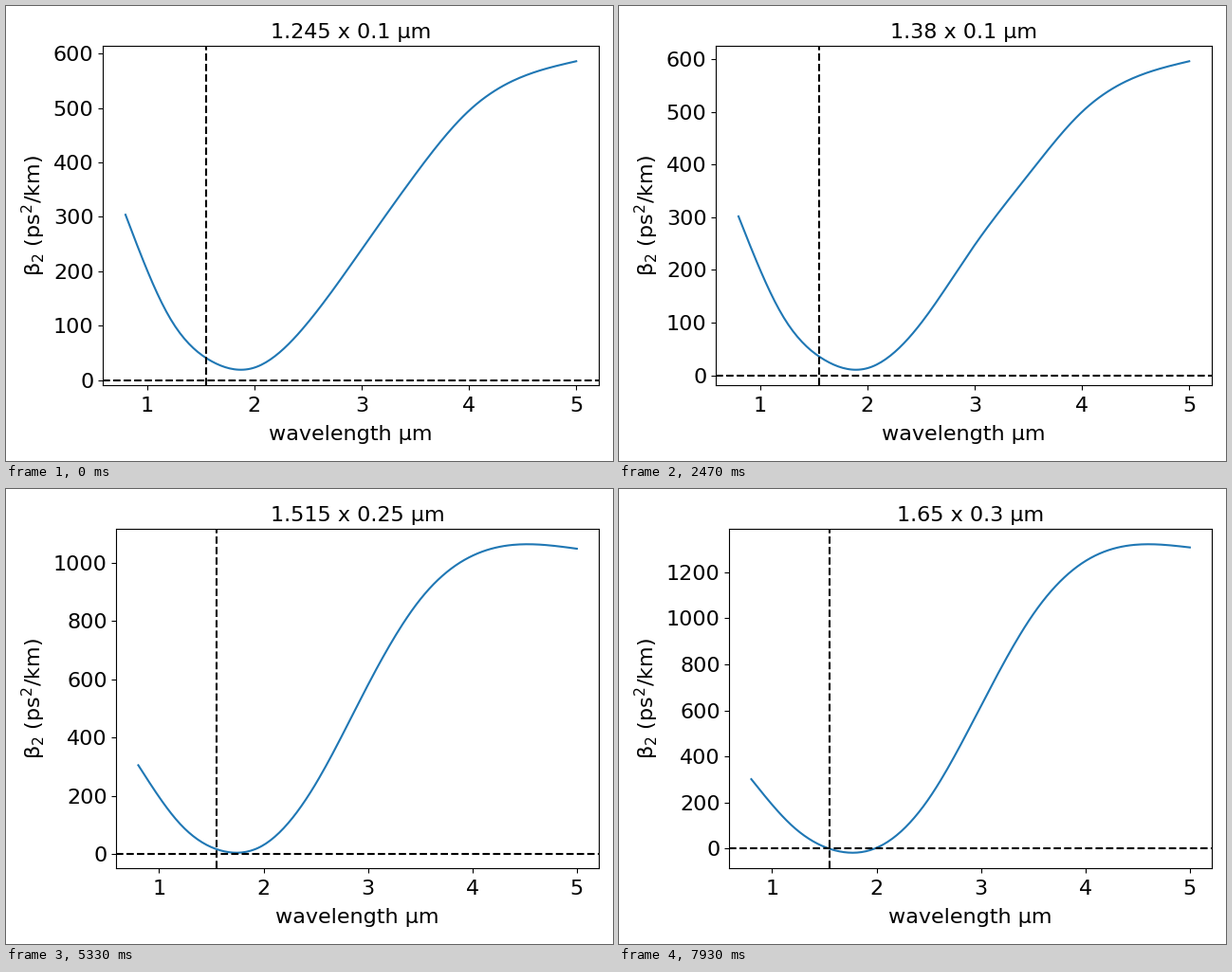
Recreate the animation shown at these times as a matplotlib script. Size 640x480 px, loop 8000 ms.

```python
import matplotlib.pyplot as plt
import numpy as np
from matplotlib.animation import FuncAnimation

plt.rcParams.update({"font.family": "DejaVu Sans", "font.size": 16,
                     "axes.titlesize": 16, "xtick.major.pad": 5})

LOOP, STEP, TICK = 8000, 130, 40      # ms
HEIGHTS = 19                          # heights swept per width

# Key points of the dispersion curve for five (width, height) pairs
KEYS = np.array([.8, 1.2, 1.6, 2, 2.5, 3, 3.5, 4, 5])
CURVES = {
    (1.245, .1): [304, 119, 35, 23, 106, 240, 378, 495, 586],
    (1.245, .8): [273, -6, -195, -138, 930, 2855, 3600, 3395, 3058],
    (1.38, .35): [310, 95, 4, 54, 377, 872, 1265, 1386, 1333],
    (1.515, .9): [288, 13, -205, -344, 20, 1530, 3400, 4380, 4835],
    (1.65, .3): [302, 96, -7, 4, 217, 620, 1018, 1249, 1308],
}


def spline(x, y, xs):
    """Natural cubic spline through the columns of y."""
    n, d = len(x), np.diff(x)[:, None]
    slope = np.diff(y, axis=0) / d
    a, b = np.eye(n), np.zeros_like(y)
    for i in range(1, n - 1):
        a[i, i - 1:i + 2] = d[i - 1, 0], 2 * (d[i - 1, 0] + d[i, 0]), d[i, 0]
        b[i] = 6 * (slope[i] - slope[i - 1])
    m = np.linalg.solve(a, b)
    i = np.clip(np.searchsorted(x, xs) - 1, 0, n - 2)
    t = (xs - x[i])[:, None]
    lin = slope[i] - d[i] * (2 * m[i] + m[i + 1]) / 6
    return y[i] + lin * t + m[i] / 2 * t**2 + (m[i + 1] - m[i]) / (6 * d[i]) * t**3


def terms(w, h):
    """Quadratic in height; the width matters less in thin guides."""
    u = w - 1.4
    return [1, h, h * h, h * u, h * h * u]


wavelength = np.linspace(.8, 5, 200)
shapes = spline(KEYS, np.array(list(CURVES.values()), float).T, wavelength)
model = shapes @ np.linalg.inv(np.array([terms(*size) for size in CURVES]).T)

fig, ax = plt.subplots(figsize=(6.4, 4.8), dpi=100)


def draw(n):
    step = (n * TICK + TICK - 10) // STEP
    col, row = divmod(step, HEIGHTS)
    w, h = round(1.245 + .135 * col, 3), round(.1 + .05 * row, 2)
    title = f"{w} x {h} µm"
    if ax.get_title() == title:
        return
    ax.clear()
    ax.plot(wavelength, model @ terms(w, h))
    ax.axhline(0, color="k", ls="--")
    ax.axvline(1.55, color="k", ls="--")
    ax.set_title(title)
    ax.set_xlabel("wavelength µm", labelpad=7.6)
    ax.set_ylabel("β$_2$ (ps$^2$/km)")
    fig.tight_layout(pad=.675)
    fig.subplots_adjust(top=438 / 480, bottom=80 / 480)


anim = FuncAnimation(fig, draw, frames=LOOP // TICK, interval=TICK,
                     repeat=True, repeat_delay=0)
plt.show()
```
